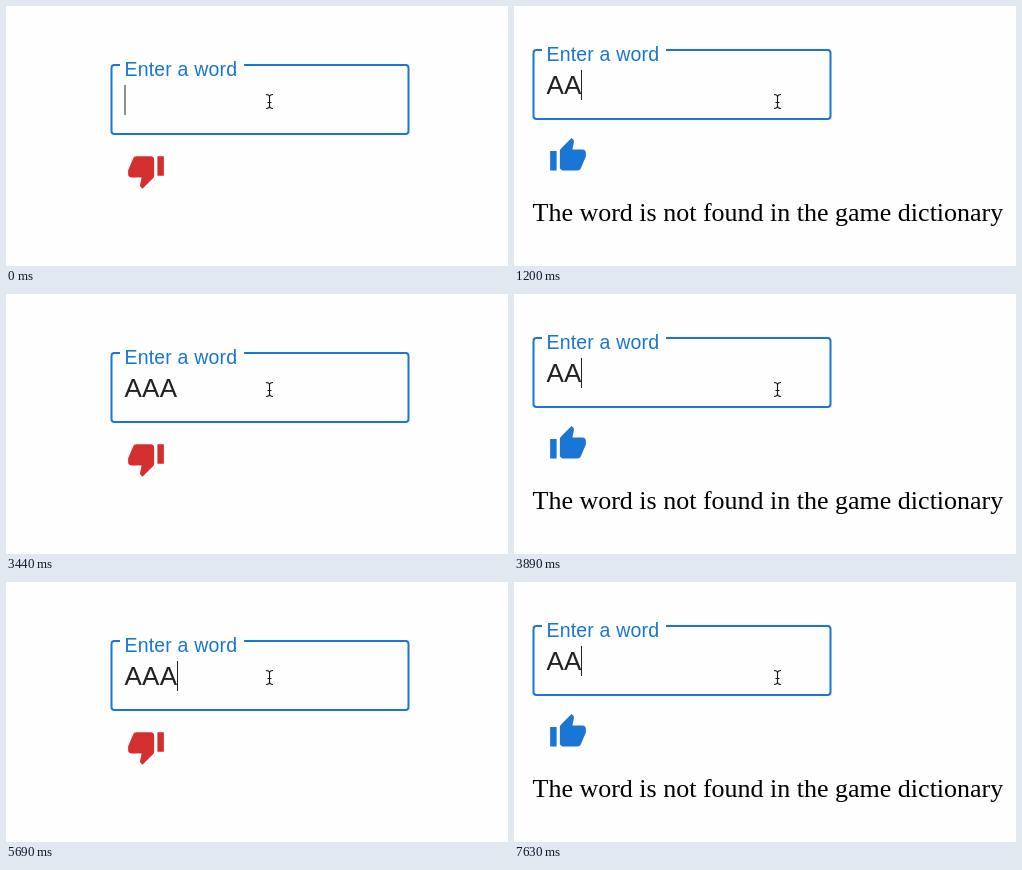
An HTML page that plays this animation: 502x260 px, repeating every 8000 ms.

```html
<!DOCTYPE html>
<html lang="en">
<head>
<meta charset="utf-8">
<title>Word check</title>
<style>
  html, body { margin: 0; width: 100%; height: 100%; overflow: hidden; background: #fefefe; }
  svg { display: block; }
  text { font-family: "Liberation Sans", Arial, sans-serif; letter-spacing: .00938em; }
  .note { font: 26px "Liberation Serif", Times, serif; letter-spacing: 0; }
  .line { fill: none; stroke: #1976d2; stroke-width: 2; }
  .pointer { fill: none; stroke: #111; stroke-width: 1.1; }
</style>
</head>
<body>
<svg width="502" height="260" viewBox="0 0 502 260">
  <g id="form">
    <path class="line" d="M28 44H22.500a3 3 0 0 0-3 3V110a3 3 0 0 0 3 3H313.500a3 3 0 0 0 3-3V47a3 3 0 0 0-3-3H152"/>
    <text x="32.500" y="55" font-size="19.500" fill="#1976d2">Enter a word</text>
    <text id="word" x="32.500" y="88" font-size="26" fill="#212121"></text>
    <rect id="caret" y="64" width="1" height="30" fill="#212121"/>
    <g transform="translate(34.500 130.400) scale(1.625)">
      <path id="thumb" d="M1 21h4V9H1v12zm22-11c0-1.100-.9-2-2-2h-6.310l.95-4.570.03-.32c0-.41-.17-.79-.44-1.060L14.170 1 7.590 7.590C7.220 7.950 7 8.450 7 9v10c0 1.100.9 2 2 2h9c.83 0 1.540-.5 1.840-1.220l3.020-7.050c.09-.23.14-.47.14-.73v-2z"/>
    </g>
  </g>
  <text id="note" class="note" x="18.500" y="215">The word is not found in the game dictionary</text>
  <path class="pointer" d="M260 88.500q3.500 0 3.500 2.500V100q0 2.500-3.500 2.500M267 88.500q-3.500 0-3.500 2.500V100q0 2.500 3.500 2.500M261.500 96.500h4"/>
</svg>
<script>
const LOOP = 8000;
const CARET_X = [32.5, 49.5, 67, 85];
// Each row: start of a word length, its letter count, then the caret toggle times.
const STATES = [
  [0, 0],
  [150, 1, 750],
  [1200, 2, 1650, 2100, 2700],
  [2850, 3, 3440],
  [3890, 2, 4340, 4940, 5390],
  [5690, 3, 6140, 6740],
  [7040, 2, 7180, 7630]
];
const el = id => document.getElementById(id);
const form = el("form"), word = el("word"), caret = el("caret"), thumb = el("thumb"), note = el("note");
const show = (node, on) => node.setAttribute("visibility", on ? "visible" : "hidden");

function draw(now) {
  const t = now % LOOP;
  const [, count, ...toggles] = STATES.findLast(s => s[0] <= t);
  const good = count === 2;
  form.setAttribute("transform", good ? "" : "translate(86 15)");
  word.textContent = "A".repeat(count);
  caret.setAttribute("x", CARET_X[count]);
  show(caret, toggles.filter(at => at <= t).length % 2 === 0);
  thumb.setAttribute("fill", good ? "#1976d2" : "#d32f2f");
  thumb.setAttribute("transform", good ? "" : "rotate(180 12 12)");
  show(note, good);
}

const start = performance.now();
function tick() {
  draw(performance.now() - start);
  requestAnimationFrame(tick);
}
tick();
</script>
</body>
</html>
```
